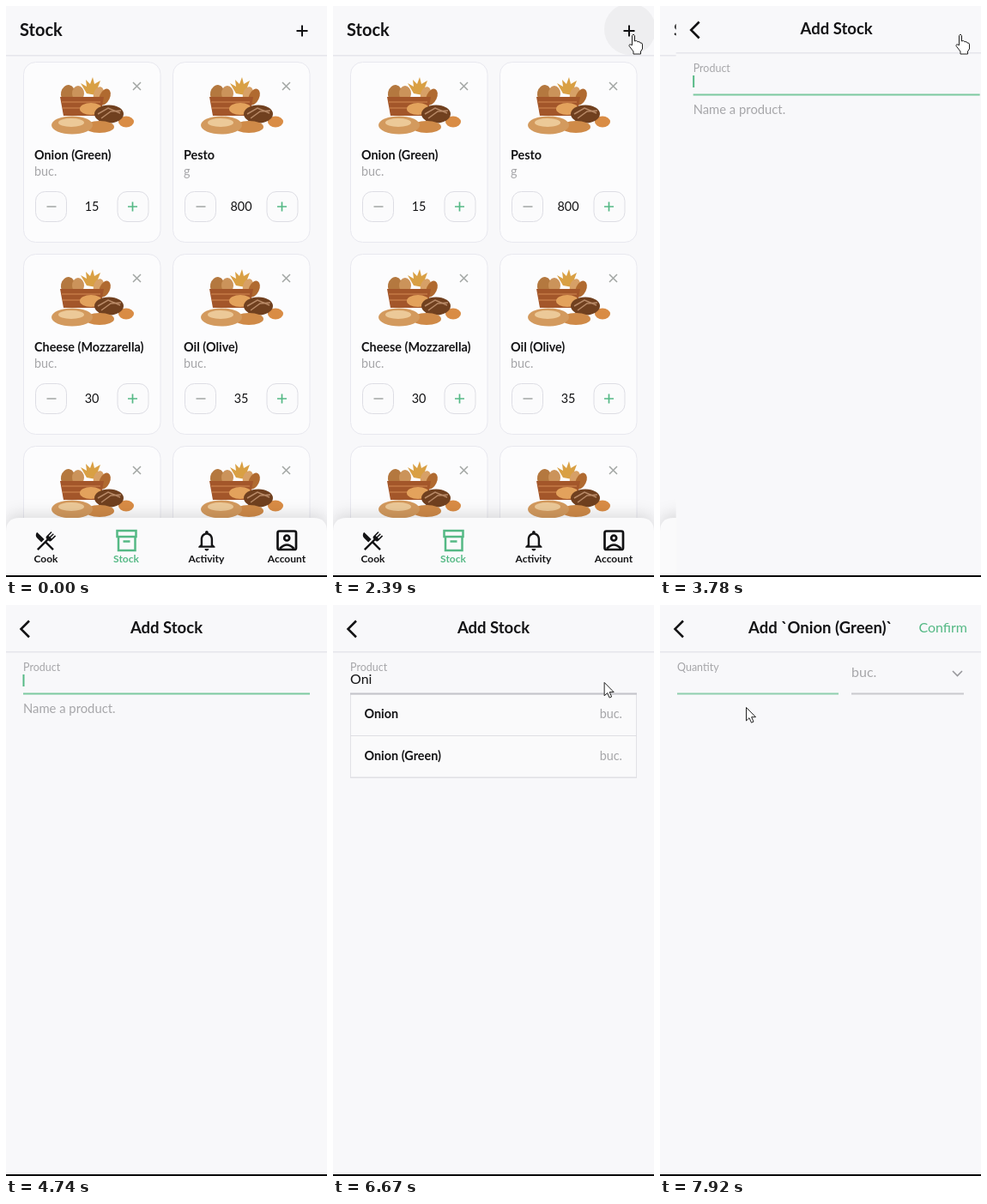
Animation, 374 px wide and 666 px high, one loop 7.99 s. Source, as an HTML page:

```html
<!DOCTYPE html>
<html lang="en">
<head>
<meta charset="utf-8">
<title>Stock app</title>
<style>
html, body { margin: 0; width: 100%; height: 100%; overflow: hidden; background: #f8f8fa; }
svg { display: block; width: 100vw; height: 100vh; font: 14.4px Lato, "Open Sans", sans-serif; fill: #141416; }
.b { font-weight: 700; }
.soft { fill: #a6a6a9; }
.green { fill: #55b985; }
.mid { text-anchor: middle; }
.end { text-anchor: end; }
.line { fill: none; stroke: #111113; }
.bg { fill: #f8f8fa; }
.rule { fill: #e6e6ec; }
.box { fill: #fcfcfd; stroke: #e8e8ef; }
.btn { fill: #fbfbfc; stroke: #dddde4; }
.list { fill: #fafafb; stroke: #e2e2e6; }
#nav { filter: drop-shadow(0 -4px 9px rgba(0, 0, 0, .13)); }
</style>
</head>
<body>
<svg id="stage" viewBox="0 0 374 666" preserveAspectRatio="none">
<defs>
  <g id="bread">
    <path d="M42 34 35 22 42 26 41 18 46 23 49 15 51 23 58 19 55 27 60 27 53 36Z" fill="#d9a044"/>
    <ellipse cx="20" cy="34" rx="8" ry="10" fill="#b4783f" transform="rotate(12 20 34)"/>
    <ellipse cx="32" cy="34" rx="7" ry="9" fill="#cb935a"/>
    <ellipse cx="56" cy="35" rx="6" ry="9" fill="#d7a066" transform="rotate(15 56 35)"/>
    <ellipse cx="63" cy="38" rx="6" ry="10" fill="#b06a30" transform="rotate(25 63 38)"/>
    <path d="M11 38H62L58 60H15Z" fill="#a3562a"/>
    <path d="M13 44H58M14 51H56" stroke="#c47a45" stroke-width="1.500"/>
    <ellipse cx="47" cy="52" rx="13" ry="7" fill="#e3a25c"/>
    <ellipse cx="88" cy="67" rx="9" ry="6.500" fill="#d98c45"/>
    <ellipse cx="68" cy="58" rx="17" ry="10.500" fill="#70401f"/>
    <path d="M55 58 67 51 81 57M59 63 70 55 82 54" fill="none" stroke="#b98a68" stroke-width="1.500"/>
    <ellipse cx="57" cy="73" rx="17" ry="7" fill="#cf8a48"/>
    <ellipse cx="25" cy="71" rx="24" ry="10.500" fill="#d39a5e"/>
    <ellipse cx="24" cy="68" rx="15" ry="5" fill="#ecc998"/>
  </g>
  <clipPath id="head"><rect width="374" height="57"/></clipPath>
  <clipPath id="menu"><rect x="19" y="104" width="336" height="265"/></clipPath>
</defs>

<g id="stock">
  <rect class="bg" width="374" height="666"/>
  <g id="cards"></g>
  <rect class="bg" width="374" height="57"/>
  <rect class="rule" y="57" width="374" height="1.5"/>
  <g clip-path="url(#head)">
    <circle id="halo" cx="346" cy="27" r="30" fill="#eeeef0"/>
    <circle id="ripple" cx="346" cy="27" fill="#dcdce0"/>
  </g>
  <text class="b" x="16" y="35" font-size="20">Stock</text>
  <path class="line" stroke-width="2" d="M345 22.5V35.5M338.500 29H351.500"/>
  <path id="nav" d="M0 664V613Q0 597 16 597H358Q374 597 374 613V664Z" fill="#fafafb"/>
  <path transform="translate(31.500 609.500) scale(1.2)" d="M8.1 13.34 3.91 9.16C2.35 7.590 2.35 5.060 3.91 3.5L10.93 10.5ZM13.41 13 20.29 19.88 18.88 21.29 12 14.41 5.12 21.29 3.71 19.88 13.36 10.22 13.16 10C12.38 9.23 12.38 7.97 13.16 7.19L17.5 2.82 18.43 3.74 15.19 7 16.15 7.94 19.39 4.69 20.31 5.61 17.06 8.85 18 9.81 21.26 6.56 22.18 7.5 17.81 11.84C17.03 12.62 15.77 12.62 15 11.84L14.78 11.64Z"/>
  <path d="M129.500 612H151.500V619H129.500ZM131 619V635H150.500V619M136.500 624.500H144.500" fill="none" stroke="#55b985" stroke-width="2.5"/>
  <path transform="translate(219.500 609) scale(1.2)" fill-rule="evenodd" d="M12 22c1.1 0 2-.9 2-2h-4c0 1.100.9 2 2 2zm6-6v-5c0-3.070-1.630-5.640-4.500-6.320V4c0-.83-.67-1.500-1.500-1.500s-1.500.67-1.500 1.500v.68C7.640 5.360 6 7.920 6 11v5l-2 2v1h16v-1zm-2 1H8v-6c0-2.480 1.510-4.500 4-4.500s4 2.020 4 4.500z"/>
  <g class="line" stroke-width="2.7">
    <rect x="316.500" y="612.500" width="21.500" height="21.500" rx="2"/>
    <circle cx="327.200" cy="620.500" r="3"/>
    <path d="M319 633Q327.200 624 335.500 633"/>
  </g>
  <g class="b mid" font-size="12">
    <text x="46.500" y="649">Cook</text>
    <text class="green" x="140" y="649">Stock</text>
    <text x="233.500" y="649">Activity</text>
    <text x="327" y="649">Account</text>
  </g>
</g>

<g id="page">
  <rect class="bg" width="374" height="666"/>
  <rect class="rule" y="54" width="374" height="1.5"/>
  <path class="line" stroke-width="2.5" d="M27 18.500 17.500 28 27 37.500"/>
  <text id="title" class="b mid" x="187" y="33" font-size="18.500"></text>
  <g id="search">
    <text class="soft" x="20" y="77" font-size="12.500">Product</text>
    <text id="typed" x="20" y="91.500" font-size="16"></text>
    <text class="soft" x="20" y="126" font-size="14.800">Name a product.</text>
    <g id="all" clip-path="url(#menu)"></g>
    <g id="found"></g>
    <rect id="under" x="20" y="102.500" width="334" height="2"/>
  </g>
  <g id="amount">
    <text id="label" class="soft" x="20">Quantity</text>
    <rect x="20" y="102.500" width="188" height="2" fill="#8fcfae"/>
    <text class="soft" x="223" y="83.500" font-size="16">buc.</text>
    <path d="M341 77 346.500 82.500 352 77" fill="none" stroke="#98989c" stroke-width="1.600"/>
    <rect x="223" y="102.500" width="131" height="2" fill="#c9c9ce"/>
    <text class="green end" x="358" y="32" font-size="16">Confirm</text>
  </g>
  <rect id="caret" class="green" y="81" width="2" height="14"/>
</g>

<rect y="664" width="374" height="2" fill="#000"/>
<g id="cursor" fill="#fff" stroke="#222" stroke-linejoin="round">
  <path id="arrow" d="M.5.5V16L4 12.700 6.500 18.200 9 17.100 6.600 11.700H11.500Z"/>
  <path id="hand" d="M-1.500 1.500Q0-1.500 1.500 1.500V8Q4 6.500 5 8.800Q7.500 7.800 8 10Q10.500 9.500 10.500 12V17L8.500 20V23H0V20L-5 13.500Q-5 10.500-1.500 12.800Z"/>
</g>
</svg>

<script>
const $ = id => document.getElementById(id);
const set = (id, attrs) => { for (const k in attrs) $(id).setAttribute(k, attrs[k]); };
const show = (id, on) => set(id, { opacity: +on });
const ramp = (t, from, to) => Math.min(1, Math.max(0, (t - from) / (to - from)));
const within = (t, from, to) => t >= from && t < to;

function card(name, unit, count, i) {
  return `<g transform="translate(${20 + i % 2 * 174} ${65 + (i >> 1) * 224})">
    <rect class="box" x=".5" y=".5" width="159.500" height="210" rx="14"/>
    <use href="#bread" x="32" y="3"/>
    <path d="M128 24 137 33M137 24 128 33" stroke="#a2a6a4" stroke-width="1.500"/>
    <text class="b" x="13" y="114">${name}</text>
    <text class="soft" x="13" y="132.500">${unit}</text>
    <rect class="btn" x="14.500" y="151.500" width="36" height="35" rx="11"/>
    <rect class="btn" x="110" y="151.500" width="36" height="35" rx="11"/>
    ${i ? '' : '<rect id="glow" x="110" y="151.500" width="36" height="35" rx="11" fill="#ececee"/>'}
    <path d="M27.500 169H38.500" stroke="#a2a6a4" stroke-width="1.500"/>
    <path d="M122 169H133M127.500 163.500V174.500" stroke="#55b985" stroke-width="1.700"/>
    <text class="mid" x="80" y="173.500">${count}</text>
  </g>`;
}

function list(rows, bottom, hover = '') {
  return `<rect class="list" x="20.500" y="104" width="333" height="${bottom - 104}"/>${hover}` +
    rows.map(([name, unit], i) => {
      const y = 132 + i * 48.8;
      return `<text class="b" x="36.500" y="${y}">${name}</text>
        <text class="soft end" x="337" y="${y}">${unit}</text>
        <rect x="20" y="${y + 20}" width="334" height="1" fill="#dedee3"/>`;
    }).join('');
}

$('cards').innerHTML = [
  ['Onion (Green)', 'buc.', 15], ['Pesto', 'g', 800],
  ['Cheese (Mozzarella)', 'buc.', 30], ['Oil (Olive)', 'buc.', 35],
  ['', '', ''], ['', '', '']
].map((c, i) => card(...c, i)).join('');
$('all').innerHTML = list([
  ['Ancho Chili', 'buc.'], ['Oil', 'buc.'], ['Onion', 'buc.'],
  ['Jalapeño pepper', 'buc.'], ['Oregano', 'g'], ['Tomato', 'buc.']
], 368.5);
$('found').innerHTML = list([['Onion', 'buc.'], ['Onion (Green)', 'buc.']], 201,
  `<rect id="row" x="20" y="153" width="334" height="48.500" fill="#e9e9ec"/>
   <circle id="press" cx="122" cy="177" fill="#b4b4b8"/>`);

// cubic-bezier(.32, .72, 0, 1)
function glide(p) {
  let lo = 0, hi = 1, s;
  for (let i = 0; i < 24; i++) {
    s = (lo + hi) / 2;
    if (.96 * (1 - s) ** 2 * s + s ** 3 < p) lo = s; else hi = s;
  }
  return 2.16 * (1 - s) ** 2 * s + 3 * (1 - s) * s * s + s ** 3;
}

// time, x, y
const path = [
  [880, 33, 625], [1150, 66, 480], [1380, 108, 325], [1525, 150, 236], [1570, 200, 190],
  [1660, 340, 80], [1760, 354, 48], [1950, 350, 33], [3920, 350, 33], [4080, 374, 36],
  [6560, 372, 60], [6820, 240, 130], [7080, 125, 179], [7370, 125, 179], [7700, 133, 173],
  [7919, 133, 173], [7920, 100, 119]
];
function pointer(t) {
  const i = path.findIndex(k => k[0] > t);
  if (i < 1) return path[i ? path.length - 1 : 0].slice(1);
  const a = path[i - 1], b = path[i], p = ramp(t, a[0], b[0]);
  return [a[1] + (b[1] - a[1]) * p, a[2] + (b[2] - a[2]) * p];
}

const LOOP = 7990, CHOSEN = 7450;
function draw(t) {
  show('glow', ramp(t, 1490, 1550) * (1 - ramp(t, 1550, 1750)));
  show('halo', ramp(t, 1720, 2000));
  set('ripple', { r: 30 * ramp(t, 3410, 3750), opacity: t < 3410 ? 0 : .6 });

  const slide = 374 * (1 - glide(ramp(t, 3520, 4060)));
  set('page', { transform: `translate(${slide} 0)` });
  const chosen = t >= CHOSEN;
  $('title').textContent = chosen ? 'Add `Onion (Green)`' : 'Add Stock';
  show('search', !chosen);
  show('amount', chosen);

  const typed = 'Oni'.slice(0, [4960, 5280, 5440].filter(k => t >= k).length);
  $('typed').textContent = typed;
  const width = typed && !chosen ? $('typed').getComputedTextLength() + .5 : 0;
  set('caret', { x: 19.5 + width });
  show('caret', within(t, 3520, 4240) || within(t, 4740, 5940) || within(t, CHOSEN, 7920));
  set('under', { fill: t < 5440 ? '#7cc9a0' : '#c4c4ca' });

  show('all', ramp(t, 5440, 5540) * (1 - ramp(t, 5840, 6040)));
  show('found', ramp(t, 5790, 5900));
  show('row', ramp(t, 6960, 7080));
  set('press', { r: 12 * ramp(t, 7230, 7330) + 30 * ramp(t, 7330, 7450), opacity: .35 });
  const up = ramp(t, CHOSEN, CHOSEN + 200);
  set('label', { y: 89 - 12 * up, 'font-size': 16 - 3.5 * up });

  const [x, y] = pointer(t);
  const hand = within(t, 1500, 1550) || within(t, 1680, 4080);
  set('cursor', { transform: `translate(${x} ${y})` });
  show('cursor', within(t, 880, 4080) || t >= 6560);
  show('hand', hand);
  show('arrow', !hand);
}

const start = performance.now();
function tick() {
  draw((performance.now() - start) % LOOP);
  requestAnimationFrame(tick);
}
tick();
</script>
</body>
</html>
```
